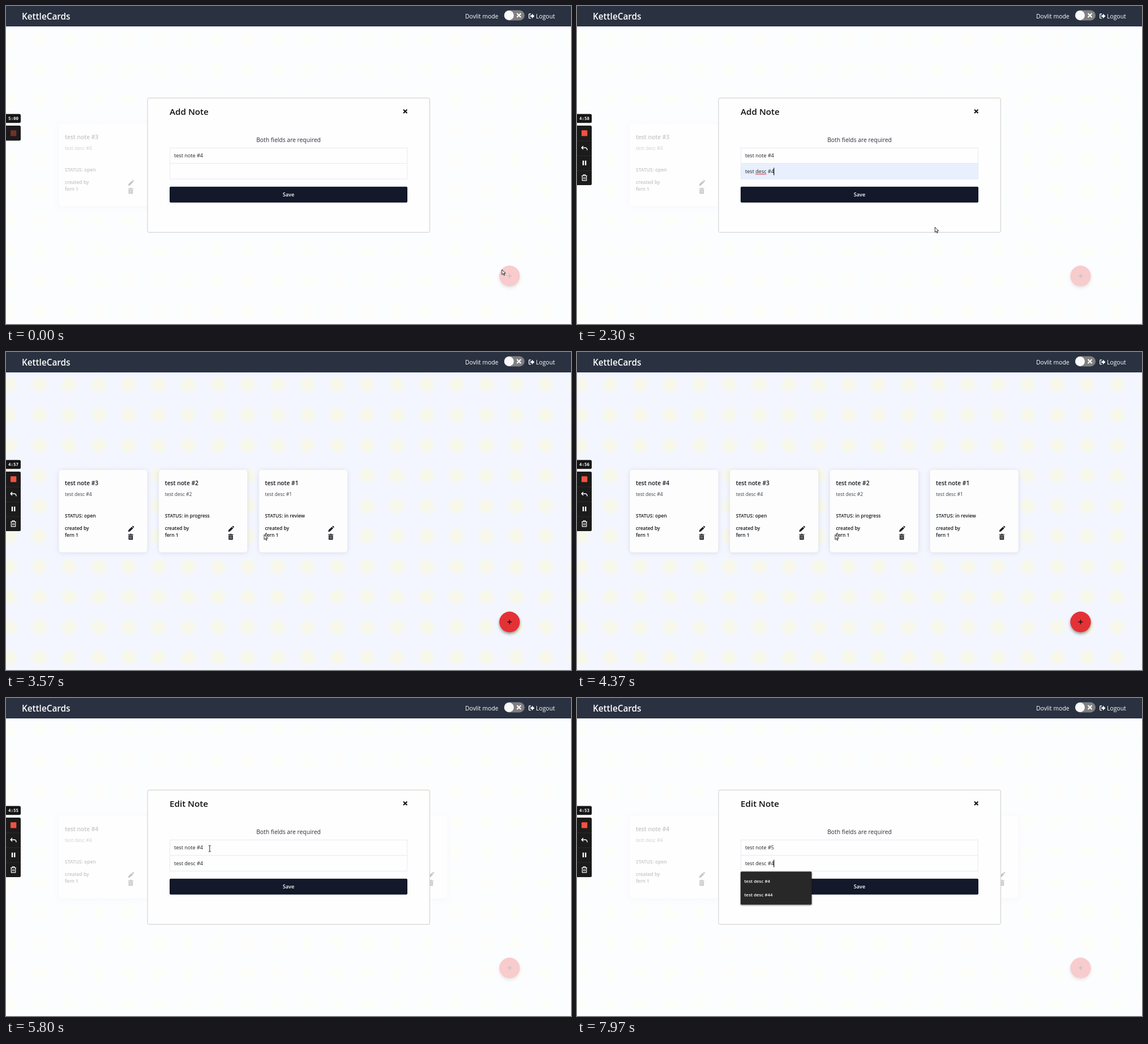
An HTML page for the animation above (8000 ms loop, 998x561 px).

```html
<!DOCTYPE html>
<html lang="en">
<head>
<meta charset="utf-8">
<title>KettleCards</title>
<style>
  html, body { margin: 0; width: 100%; height: 100%; overflow: hidden; background: #f4f6ff; }
  svg { display: block; width: 998px; height: 561px; font-family: "Open Sans", sans-serif; }
  .semi { font-weight: 600; }
  .mono { font: bold 7.5px "DejaVu Sans Mono", monospace; }
  .card { filter: drop-shadow(0 1px 4px rgba(70, 80, 120, .16)); }
  .fab { filter: drop-shadow(0 3px 2.5px rgba(0, 0, 0, .38)); }
  .drop { filter: drop-shadow(0 1px 1.5px rgba(0, 0, 0, .5)); }
</style>
</head>
<body>
<svg viewBox="0 0 998 561">
  <defs>
    <radialGradient id="glow">
      <stop offset="0" stop-color="#f8f8e7"/>
      <stop offset=".55" stop-color="#f8f8e7" stop-opacity=".8"/>
      <stop offset="1" stop-color="#f8f8e7" stop-opacity="0"/>
    </radialGradient>
    <pattern id="dots" x="32.3" y="30.7" width="52.65" height="53.5" patternUnits="userSpaceOnUse">
      <circle cx="26.3" cy="26.7" r="17" fill="url(#glow)"/>
    </pattern>
    <g id="pencil" fill="#15171c">
      <path d="M0 10.5L.6 7.4 6.3 1.7 8.8 4.2 3.1 9.9zM7 1L7.8.3Q8.4-.2 9 .4L10.1 1.5Q10.7 2.1 10.2 2.7L9.5 3.5z"/>
    </g>
    <g id="bin">
      <path fill="#15171c" d="M0 .9H2.8L3.3 0H5.7L6.2.9H9V2.1H0zM.7 2.8H8.3V9.5Q8.3 10.5 7.3 10.5H1.7Q.7 10.5 .7 9.5z"/>
      <path stroke="#fff" stroke-width=".6" d="M2.7 4V9.2M4.5 4V9.2M6.3 4V9.2"/>
    </g>
    <path id="arrow" fill="#fff" stroke="#111" stroke-width=".9" d="M0 0V9L2.1 7.1 3.6 10.3 5 9.7 3.6 6.6H6.4z"/>
    <path id="hand" fill="#fff" stroke="#111" stroke-width=".8" d="M-.9.8Q0-.5.9.8V4.2Q2 3.5 2.5 4.6 3.6 4 4 5 5.3 4.6 5.3 6V8.6Q5 11.5 3.8 12H-.2Q-1.6 10.4-3.2 7.4-3.3 5.8-1.8 6.5L-.9 7.6z"/>
    <path id="beam" fill="none" stroke="#222" d="M-2-5.5Q0-5.5 0-4.5 0-5.5 2-5.5M0-4.5V4.5M-2 5.5Q0 5.5 0 4.5 0 5.5 2 5.5"/>
  </defs>
  <g id="scene"></g>
</svg>
<script>
const LOOP = 8000;
const scene = document.getElementById("scene");

const text = (x, y, size, s, fill = "#15171c", more = 'class="semi"') =>
  `<text x="${x}" y="${y}" font-size="${size}" fill="${fill}" ${more}>${s}</text>`;
const rect = (x, y, w, h, fill, more = "") =>
  `<rect x="${x}" y="${y}" width="${w}" height="${h}" fill="${fill}" ${more}/>`;
const line = (d, stroke, width) =>
  `<path d="${d}" fill="none" stroke="${stroke}" stroke-width="${width}"/>`;
const use = (id, x, y) => `<use href="#${id}" x="${x}" y="${y}"/>`;
const ease = p => p * p * (3 - 2 * p);
const clamp = p => Math.max(0, Math.min(1, p));

// Latest value whose start time has passed
const at = (t, steps) => steps.filter(s => s[0] <= t).pop()[1];

const NOTES = [[4, 4, "open"], [3, 4, "open"], [2, 2, "in progress"], [1, 1, "in review"]];
const DESCS = ["12121", "test desc #4", "teststsetse", "a", "rest 3", "faasdfsdfasfasdf"];

// Pointer stops: time, x, y
const STOPS = [[0, 876, 465], [1970, 876, 465], [2600, 423, 326], [2950, 423, 326],
  [3500, 456, 322], [4470, 456, 322], [5100, 220, 310], [5420, 220, 310], [5850, 365, 264], [8000, 365, 264]];

function header() {
  return rect(0, 0, 998, 36, "#2a3241") +
    text(28, 23.5, 15.3, "KettleCards", "#fff") +
    text(811, 21.7, 10.4, "Dovlit mode", "#fff", "") +
    rect(880, 7.5, 36, 18, "#808080", 'rx="9"') +
    `<circle cx="888.5" cy="16.5" r="8.5" fill="#fafafa"/>` +
    line("M902.5 13L909.5 20M909.5 13L902.5 20", "#fff", 2.2) +
    line("M927 14H924.6Q923.8 14 923.8 15V20.6Q923.8 21.6 924.6 21.6H927", "#fff", 1.4) +
    `<path fill="#fff" d="M926.3 16.3H929V13.6L933.5 17.8 929 22V19.3H926.3z"/>` +
    text(936, 21.7, 10.4, "Logout", "#fff", "");
}

function card([n, desc, status], i) {
  return `<g transform="translate(${93.5 + 176.7 * i} 208)">` +
    rect(0, 0, 156, 145.5, "#fdfdfd", 'rx="5" class="card"') +
    text(10.5, 27, 10.2, "test note #" + n) +
    text(10.5, 46, 8.5, "test desc #" + desc, "#40444c", "") +
    text(10.5, 83.7, 8.45, "STATUS: " + status) +
    text(10.5, 106, 8.45, "created by") +
    text(10.5, 118, 8.45, "fern 1") +
    use("pencil", 122.3, 98.7) + use("bin", 122.3, 112.7) + "</g>";
}

function plusButton() {
  return `<circle cx="889.5" cy="476.3" r="18.2" fill="#e43136" class="fab"/>` +
    line("M885.5 476.3H893.5M889.5 472.3V480.3", "#111", 1.4);
}

function dropdown(y, items, picked) {
  return rect(289, y, 125.5, 11.6 + 23.4 * items.length, "#272827", 'rx="1.5" class="drop"') +
    (picked >= 0 ? rect(289, y + 5.8 + 23.4 * picked, 125.5, 23.4, "#474947") : "") +
    items.map((s, i) => text(295.5, y + 20 + 23.4 * i, 7.9, s, "#fff")).join("");
}

const caret = (x, y) => rect(x, y, 1.2, 13, "#111");

function modal(t) {
  const editing = t > 4000;
  const filled = !editing && t >= 1900;
  const picked = at(t, [[0, -1], [1350, 0], [1600, 1]]);
  const name = at(t, [[0, "test note #4"], [7100, "test note #"], [7280, "test note #5"]]);
  const desc = editing || filled || picked == 1 ? "test desc #4" : DESCS[picked] || "";
  const hover = t > 2520 && t < 4000;
  let out = rect(0, 36, 998, 525, "#fff", 'opacity=".75"') +
    rect(250, 162.3, 498.5, 237, "#fefefe", 'rx="2.5" stroke="#ccc"') +
    text(289, 191.5, 15.2, editing ? "Edit Note" : "Add Note", "#111") +
    line("M702 182.7L708.4 189.1M708.4 182.7L702 189.1", "#111", 2.1) +
    text(499, 240, 10.35, "Both fields are required", "#2b2e3a", 'text-anchor="middle"') +
    rect(289.5, 250.3, 419, 27.5, "#fefefe", 'stroke="#e6eafa"') +
    rect(289.5, 277.8, 419, 27.5, filled ? "#e8effd" : "#fefefe", 'stroke="#e6eafa"') +
    text(297, 267, 9.1, name, "#222", "") +
    text(297, 295, 9.1, desc, "#222", "") +
    rect(289, 318.7, 420, 28, hover ? "#0e1523" : "#13182a", 'rx="2"') +
    text(499, 336, 9.2, "Save", "#fff", 'class="semi" text-anchor="middle"');

  if (!editing) {
    if (filled) out += line("M315 296.8H334.5", "#e0343c", 1);
    const lit = (t > 450 && t < 1350) || (t > 2300 && t < 2900);
    if (lit) out += filled ? caret(347.2, 285.5) : caret(296.8, 285.2);
    if (t > 750 && !filled) out += dropdown(306.2, DESCS, picked);
  } else {
    if (t > 5950 && t < 6500) out += caret(347.2, 257.5);
    if (t > 7100 && t < 7500) out += caret(t < 7280 ? 342.5 : 347.2, 257.5);
    if (t > 7500) out += caret(347.2, 285.5);
    if (t > 6500 && t < 7280) out += dropdown(278, ["test note #4", "test note #44"]);
    if (t > 7750) out += dropdown(306.2, ["test desc #4", "test desc #44"]);
  }
  return out;
}

function recorder(t) {
  const left = 300 - Math.max(0, Math.floor((t - 1150) / 1000) + 1);
  const clock = Math.floor(left / 60) + ":" + String(left % 60).padStart(2, "0");
  const open = ease(clamp((t - 300) / 300));
  const h = 26.5 + 78.5 * open;
  let out = rect(-4, 190.5, 30, 15.8, "#151516", 'rx="2.5"') +
    `<text x="13" y="201.2" fill="#fff" text-anchor="middle" class="mono">${clock}</text>` +
    rect(-4, 211, 30, h, "#1b1b1b", 'rx="2.5"') +
    rect(8, 219.3, 10.3, 10.3, "#f4513f", `rx=".8" opacity="${0.4 + 0.6 * open}"`);
  if (open > 0) {
    out += `<svg x="0" y="211" width="26" height="${h}" overflow="hidden"><g transform="translate(0 -211)">` +
      line("M0 238H26M0 264.2H26M0 290.3H26", "#303030", .8) +
      line("M11 247L8.2 250 11 253M8.5 250H14.8Q18 250.2 18 254.6", "#fff", 1.4) +
      line("M11 272.7V281M15.2 272.7V281", "#fff", 2.4) +
      line("M8 299.5H18M11.2 299V297.7H14.8V299M9.3 300V307.8H16.7V300M11.8 302V305.6M14.2 302V305.6", "#fff", 1.2) +
      "</g></svg>";
  }
  return out;
}

function pointer(t) {
  if ((t > 450 && t < 1970) || t > 6450) return "";
  const i = STOPS.findIndex(s => s[0] > t);
  const [t0, x0, y0] = STOPS[i - 1], [t1, x1, y1] = STOPS[i];
  const p = ease((t - t0) / (t1 - t0));
  const x = x0 + (x1 - x0) * p, y = y0 + (y1 - y0) * p;
  const dialog = isOpen(t), inForm = dialog && x > 289 && x < 709;
  const shape = inForm && y > 319 && y < 347 ? "hand"
    : inForm && y > 250 && y < 305 ? "beam"
    : !dialog && x < 227 && y < 318 ? "hand" : "arrow";
  return use(shape, x.toFixed(1), y.toFixed(1));
}

const isOpen = t => t < 3150 || t >= 5480;

function draw(t) {
  const notes = t < 3900 ? NOTES.slice(1) : NOTES;
  return rect(0, 0, 998, 561, "#f4f6ff") + rect(0, 36, 998, 525, "url(#dots)") +
    notes.map(card).join("") + plusButton() +
    (isOpen(t) ? modal(t) : "") + header() + recorder(t) + pointer(t);
}

let shown = "";
function frame() {
  const next = draw(performance.now() % LOOP);
  if (next !== shown) scene.innerHTML = shown = next;
  requestAnimationFrame(frame);
}
frame();
</script>
</body>
</html>
```
